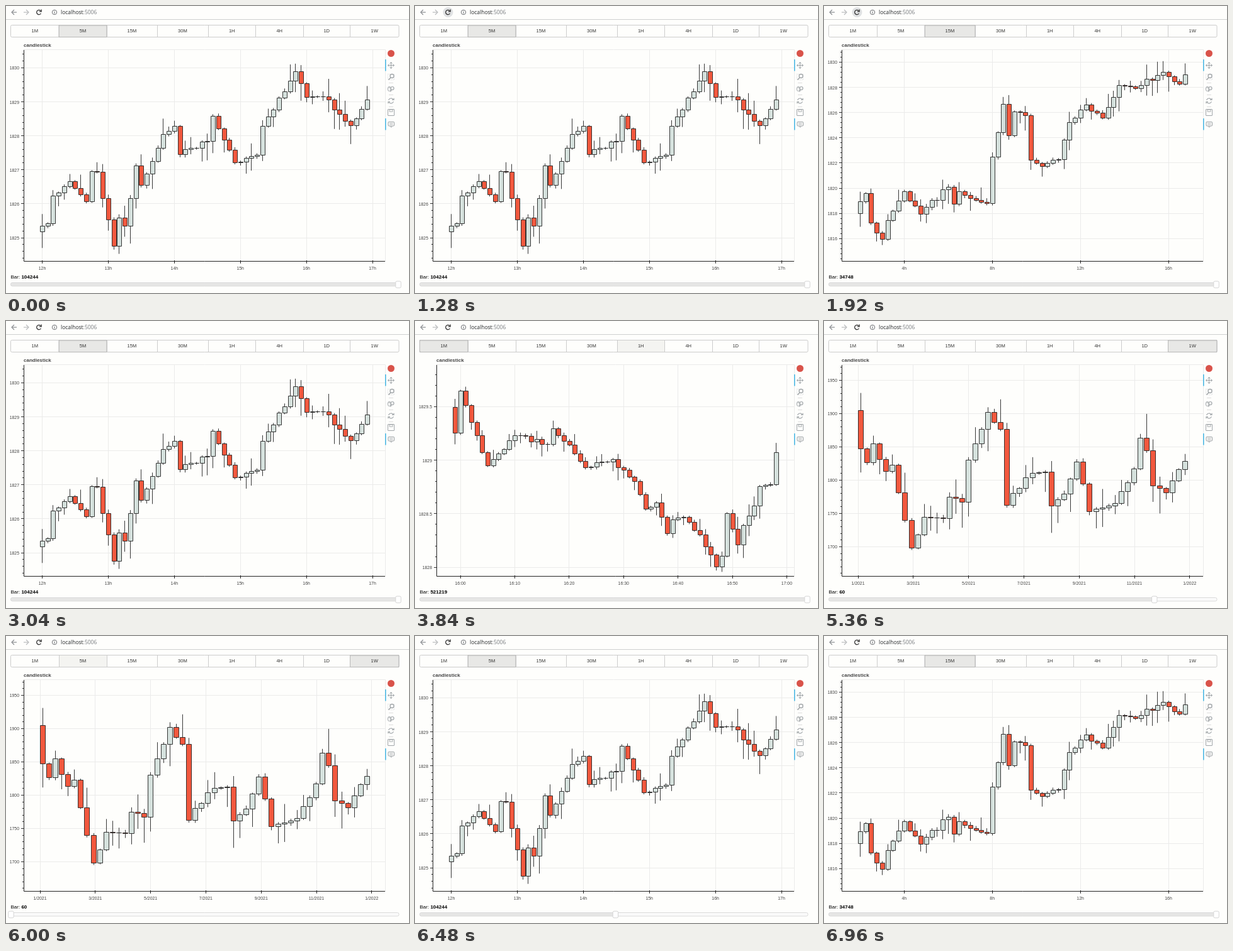
An HTML page with a canvas that plays this animation: 640x457 px, repeating every 8000 ms.

```html
<!DOCTYPE html>
<html lang="en">
<head>
<meta charset="utf-8">
<title>candlestick</title>
<style>
  html, body { margin: 0; height: 100%; overflow: hidden; background: #fefefc; }
  canvas { display: block; }
</style>
</head>
<body>
<canvas id="stage" width="640" height="457"></canvas>
<script>
const ctx = document.getElementById('stage').getContext('2d');
const LOOP = 8000, TOP = 70, BOTTOM = 406, RIGHT = 602;
const PAPER = '#fefefc', GRID = '#ebebea', INK = '#222';
const SANS = '"Liberation Sans", Arial, sans-serif';
const BUTTONS = ['1M', '5M', '15M', '30M', '1H', '4H', '1D', '1W'];
const EDGES = [7.5, 84, 160, 240, 321, 396.5, 472, 546.5, 624];

// turns: [candle, height] where the price changes direction; candle -1 is the first open.
// wick: longest wick. x and y: first labelled tick, spacing and labels.
const charts = {
  '5M': {
    bars: 104244, wick: 30,
    x: { at: 57.5, step: 104.9, names: '12h,13h,14h,15h,16h,17h' },
    y: { at: 99, step: 54.1, value: 1830, by: 1 },
    turns: [[-1, 359], [1, 346], [2, 302], [5, 279], [8, 311], [9, 263], [10, 264], [13, 382], [14, 337],
      [15, 350], [17, 254], [18, 285], [22, 204], [24, 191], [25, 236], [30, 215], [31, 175], [35, 249],
      [39, 237], [40, 191], [46, 104], [48, 145], [51, 144], [56, 190], [59, 149]]
  },
  '15M': {
    bars: 34748, wick: 24,
    x: { at: 127.3, step: 139.9, names: '4h,8h,12h,16h' },
    y: { at: 90, step: 40.1, value: 1830, by: 2 },
    turns: [[-1, 330], [1, 298], [2, 345], [4, 371], [5, 341], [8, 295], [11, 331], [16, 288], [17, 315],
      [18, 295], [21, 309], [23, 314], [24, 240], [26, 156], [27, 206], [28, 168], [30, 174], [31, 245],
      [33, 255], [36, 244], [38, 185], [41, 157], [44, 178], [47, 126], [50, 131], [55, 105], [58, 124], [59, 109]]
  },
  '1M': {
    bars: 521219, wick: 20, left: 34, start: 63.5,
    x: { at: 72, step: 86.4, names: '16:00,16:10,16:20,16:30,16:40,16:50,17:00' },
    y: { at: 137, step: 85.2, value: 1829.5, by: 0.5 },
    turns: [[-1, 137], [0, 178], [1, 111], [6, 230], [11, 182], [17, 196], [18, 171], [21, 197], [24, 233],
      [29, 220], [33, 255], [35, 299], [37, 289], [39, 338], [40, 316], [42, 312], [45, 340], [48, 391],
      [49, 374], [50, 306], [52, 356], [53, 325], [55, 294], [56, 263], [58, 260], [59, 209]]
  },
  '4H': {
    bars: 2173, wick: 32,
    x: { at: 66.3, step: 52.4, names: '12/22,,,12/25,,,12/28,,,,1/01' },
    y: { at: 87, step: 69, value: 1830, by: 10 },
    turns: [[-1, 371], [1, 384], [4, 260], [5, 271], [7, 246], [8, 258], [11, 236], [28, 236], [29, 247],
      [30, 230], [31, 253], [34, 207], [36, 225], [38, 180], [40, 255], [42, 255], [43, 265], [44, 338],
      [45, 276], [46, 264], [48, 290], [50, 262], [51, 201], [52, 178], [56, 164], [58, 92], [59, 93]]
  },
  '1W': {
    bars: 60, wick: 45, start: 58.2,
    x: { at: 54, step: 87.8, names: '1/2021,3/2021,5/2021,7/2021,9/2021,11/2021,1/2022' },
    y: { at: 95, step: 53, value: 1950, by: 50 },
    turns: [[-1, 142], [0, 203], [1, 225], [2, 195], [4, 239], [5, 229], [8, 361], [10, 312], [13, 314],
      [14, 280], [16, 288], [17, 221], [20, 145], [22, 172], [23, 293], [24, 274], [27, 242], [29, 240],
      [30, 294], [32, 275], [34, 224], [36, 303], [38, 297], [40, 290], [43, 235], [44, 186], [45, 206],
      [46, 262], [48, 273], [51, 223]]
  }
};

// The last part of a slow chart, seen with n candles for each of its own.
const zoomIn = (turns, from, n, scaleY) =>
  turns.filter(([i]) => i >= from).map(([i, y]) => [(i - from) * n - 1, scaleY(y)]);

charts['1H'] = {
  bars: 8690, wick: 24,
  x: { at: 110, step: 105, names: '12h,12/30,12h,12/31,12h' },
  y: { at: 87, step: 74.5, value: 1830, by: 10 },
  turns: zoomIn(charts['4H'].turns, 44, 4, y => 85 + (y - 85) * 1.08)
};
charts['1D'] = {
  bars: 363, wick: 30,
  x: { at: 110, step: 116, names: '11/01,11/15,12/01,12/15,1/01' },
  y: { at: 78.7, step: 47.7, value: 1880, by: 20 },
  turns: [[-1, 375], ...zoomIn(charts['1W'].turns, 39, 5, y => 85 + (y - 172) * 2.25)]
};

const noise = n => { const v = Math.sin(n * 127.1 + 3) * 43758.5453; return v - Math.floor(v); };

// Straight runs between the turns, roughened in proportion to their slope.
function closeAt(turns, i) {
  const next = turns.findIndex(([at]) => at >= i), [toI, toY] = turns[next];
  if (toI === i) return toY;
  const [fromI, fromY] = turns[next - 1];
  const rough = Math.min(9, Math.abs(toY - fromY) * 0.5);
  return fromY + (toY - fromY) * (i - fromI) / (toI - fromI) + (noise(i) - 0.5) * rough;
}

// Timelines: [start, state]
const views = [[0, '5M'], [1920, '15M'], [2880, '5M'], [3520, '1M'], [4000, '1H'], [4320, '4H'],
  [4960, '1D'], [5280, '1W'], [6320, '5M'], [6800, '15M']];
const hovers = [[0, ''], [2560, '5M'], [3360, '1M'], [3600, '5M'], [3680, '15M'], [3760, '30M'],
  [3840, '1H'], [4320, '4H'], [4800, '1D'], [5120, '1W'], [5760, ''], [5920, '15M'], [6000, '5M'], [6800, '15M']];
const reloads = [[0, ''], [1280, '#e0e2e3'], [1600, '#cfd1d3'], [1680, '#e0e2e3'], [2240, '']];
const stateAt = (track, t) => track.filter(([start]) => start <= t).pop()[1];
const ease = f => { f = Math.min(1, Math.max(0, f)); return f * f * (3 - 2 * f); };
const crisp = v => Math.floor(v) + 0.5;

function line(color, width, ...points) {
  ctx.strokeStyle = color;
  ctx.lineWidth = width;
  ctx.beginPath();
  points.forEach(([x, y]) => ctx.lineTo(x, y));
  ctx.stroke();
}
function text(str, x, y, font, color = '#444', align = 'left') {
  ctx.font = font;
  ctx.fillStyle = color;
  ctx.textAlign = align;
  ctx.fillText(str, x, y);
}
function box(x, y, w, h, r, fill, stroke, width = 1) {
  ctx.beginPath();
  ctx.roundRect(x, y, w, h, r);
  if (fill) { ctx.fillStyle = fill; ctx.fill(); }
  if (stroke) { ctx.strokeStyle = stroke; ctx.lineWidth = width; ctx.stroke(); }
}
function arc(x, y, r, from, to, color, width = 1) {
  ctx.strokeStyle = color;
  ctx.lineWidth = width;
  ctx.beginPath();
  ctx.arc(x, y, r, from, to);
  ctx.stroke();
}
function disc(x, y, r, color) {
  ctx.fillStyle = color;
  ctx.beginPath();
  ctx.arc(x, y, r, 0, 7);
  ctx.fill();
}

function drawBrowser(reload) {
  line('#cfd0d0', 1, [0, 21.5], [640, 21.5]);
  line('#8b8e91', 1.2, [17, 10], [9, 10]);
  line('#8b8e91', 1.2, [13, 6], [9, 10], [13, 14]);
  line('#b9bbbd', 1.2, [28, 10], [36, 10]);
  line('#b9bbbd', 1.2, [32, 6], [36, 10], [32, 14]);
  if (reload) disc(52.5, 10, 8, reload);
  arc(52.3, 10, 3.6, 0.5, 5.6, '#333', 1.3);
  line('#333', 1.3, [56.2, 5.5], [56.2, 8.8], [53, 8.8]);
  arc(77, 10, 3.7, 0, 7, '#5f6368', 0.9);
  line('#5f6368', 1, [77, 9.4], [77, 12]);
  line('#5f6368', 1, [77, 7.8], [77, 8.7]);
  const font = '8.5px "Open Sans", "Noto Sans", sans-serif';
  text('localhost', 87, 13, font, '#25282b');
  text(':5006', 87 + ctx.measureText('localhost').width, 13, font, '#74787c');
}

function drawButtons(active, hover) {
  const cell = i => [EDGES[i], 30.5, EDGES[i + 1] - EDGES[i], 19, 0];
  BUTTONS.forEach((name, i) => {
    const [x, y, w] = cell(i);
    if (name === hover) box(...cell(i), '#f4f4f1');
    if (name === active) {
      box(...cell(i), '#e8e8e6');
      box(x, y, w, 2, 0, '#dcdcda');
    }
    if (i) line('#ccc', 1, [crisp(x), 30.5], [crisp(x), 49.5]);
    text(name, x + w / 2, 42.3, `7.6px ${SANS}`, '#333', 'center');
  });
  box(7.5, 30.5, 616.5, 19, 2, null, '#ccc');
  box(...cell(BUTTONS.indexOf(active)), null, '#b8b8b8');
}

function drawAxes(left, x, y) {
  const label = `6.9px ${SANS}`;
  box(left + 0.5, TOP - 0.5, RIGHT - left, BOTTOM - TOP + 1, 0, null, GRID);
  text('candlestick', left, 65.3, `bold 8px ${SANS}`);
  x.names.split(',').forEach((name, k) => {
    if (!name) return;
    const tx = x.at + k * x.step;
    line(GRID, 1, [crisp(tx), TOP], [crisp(tx), BOTTOM]);
    line(INK, 1, [crisp(tx), BOTTOM - 1], [crisp(tx), BOTTOM + 4]);
    text(name, tx, 420, label, '#444', 'center');
  });
  for (let k = -5; y.at + k * y.step / 5 < BOTTOM; k++) {
    const ty = y.at + k * y.step / 5, major = k % 5 === 0;
    if (ty < TOP) continue;
    if (major) {
      line(GRID, 1, [left, crisp(ty - 0.5)], [RIGHT, crisp(ty - 0.5)]);
      text(y.value - k / 5 * y.by, left - 7, ty + 2.4, label, '#444', 'right');
    }
    line(INK, 0.9, [left - (major ? 4 : 2), crisp(ty - 0.5)], [left + (major ? 1 : 0), crisp(ty - 0.5)]);
  }
  line(INK, 1, [left + 0.5, TOP], [left + 0.5, BOTTOM + 0.5], [RIGHT, BOTTOM + 0.5]);
}

function drawCandles(turns, start, wick) {
  const last = turns[turns.length - 1][0], step = (573.5 - start) / last, w = Math.round(step * 0.8);
  for (let i = 0; i <= last; i++) {
    const open = closeAt(turns, i - 1), close = closeAt(turns, i);
    const high = crisp(Math.min(open, close)), low = crisp(Math.max(open, close));
    const reach = seed => open === close ? 0 : 2 + wick * noise(i + seed) ** 3;
    const cx = crisp(start + i * step);
    line(INK, 0.9, [cx, high - reach(70)], [cx, low + reach(140)]);
    box(crisp(cx - w / 2), high, w, low - high, 0, close > open ? '#f2583e' : '#d5e1dd', INK, 0.9);
  }
}

function drawToolbar() {
  const grey = '#a1a6a9', blue = '#26aae1';
  disc(611.5, 75.5, 5.5, '#d9534a');
  line(blue, 1.3, [602.8, 85], [602.8, 103.5]);
  line(blue, 1.3, [602.8, 179], [602.8, 197.5]);
  for (const y of [122.5, 141.5, 160.5]) line('#ddd', 1, [608, y], [615, y]);
  // pan
  line(grey, 1, [606.5, 94.5], [616.5, 94.5]);
  line(grey, 1, [611.5, 89.5], [611.5, 99.5]);
  for (const [dx, dy] of [[1, 0], [-1, 0], [0, 1], [0, -1]]) {
    const x = 611.5 + dx * 5, y = 94.5 + dy * 5;
    line(grey, 1, [x - dx * 2 + dy * 2, y - dy * 2 + dx * 2], [x, y], [x - dx * 2 - dy * 2, y - dy * 2 - dx * 2]);
  }
  // box zoom
  ctx.setLineDash([1, 1.5]);
  box(606.5, 108.5, 10, 9, 0, null, '#c4c7c9', 0.8);
  ctx.setLineDash([]);
  arc(613, 111.5, 3, 0, 7, grey, 1.3);
  line(grey, 1.6, [611, 114], [607.5, 117.5]);
  // wheel zoom
  box(606.5, 128.5, 4.5, 7, 2.2, null, grey);
  line(grey, 1, [608.7, 129], [608.7, 131]);
  arc(613.5, 131, 2.5, 0, 7, grey, 1.2);
  line(grey, 1.4, [612.5, 133], [610.5, 136.5]);
  // reset
  arc(611.5, 151, 4, 3.4, 5.9, grey, 1.2);
  arc(611.5, 151, 4, 0.3, 2.8, grey, 1.2);
  line(grey, 1.2, [613, 149.5], [616, 149.5], [616, 146.8]);
  line(grey, 1.2, [610, 152.5], [607, 152.5], [607, 155.2]);
  // save
  box(606.5, 164.5, 10, 10, 0.5, null, grey);
  box(609, 165, 5, 3.2, 0, null, grey, 0.9);
  // hover
  box(607, 184.5, 9.5, 6.5, 1.5, null, grey, 1.1);
  line(grey, 0.8, [609, 186.7], [614.5, 186.7]);
  line(grey, 0.8, [609, 188.7], [614.5, 188.7]);
  line(grey, 1, [610, 191], [611.7, 193.3], [613.4, 191]);
}

function drawSlider(bars, position) {
  text('Bar: ', 7.5, 433.5, `8px ${SANS}`, '#000');
  text(bars, 24.4, 433.5, `bold 8px ${SANS}`, '#000');
  const x = 8 + 615 * position;
  box(7.5, 440.5, 616.5, 5.5, 2.5, '#fafafa');
  box(7.5, 440.5, x - 7.5, 5.5, 2.5, '#e6e6e5');
  box(7.5, 440.5, 616.5, 5.5, 2.5, null, '#dadada');
  box(x - 4.2, 438.2, 8.4, 10.6, 2, '#fff', '#d4d4d4');
}

function draw() {
  const t = performance.now() % LOOP, view = stateAt(views, t);
  const { bars, turns, wick, x, y, left = 28, start = 57.5 } = charts[view];
  box(0, 0, 640, 457, 0, PAPER);
  drawBrowser(stateAt(reloads, t));
  drawButtons(view, stateAt(hovers, t));
  drawAxes(left, x, y);
  drawCandles(turns, start, wick);
  drawToolbar();
  drawSlider(bars, 1 - ease((t - 5280) / 320) + ease((t - 6320) / 320));
  requestAnimationFrame(draw);
}
requestAnimationFrame(draw);
</script>
</body>
</html>
```
